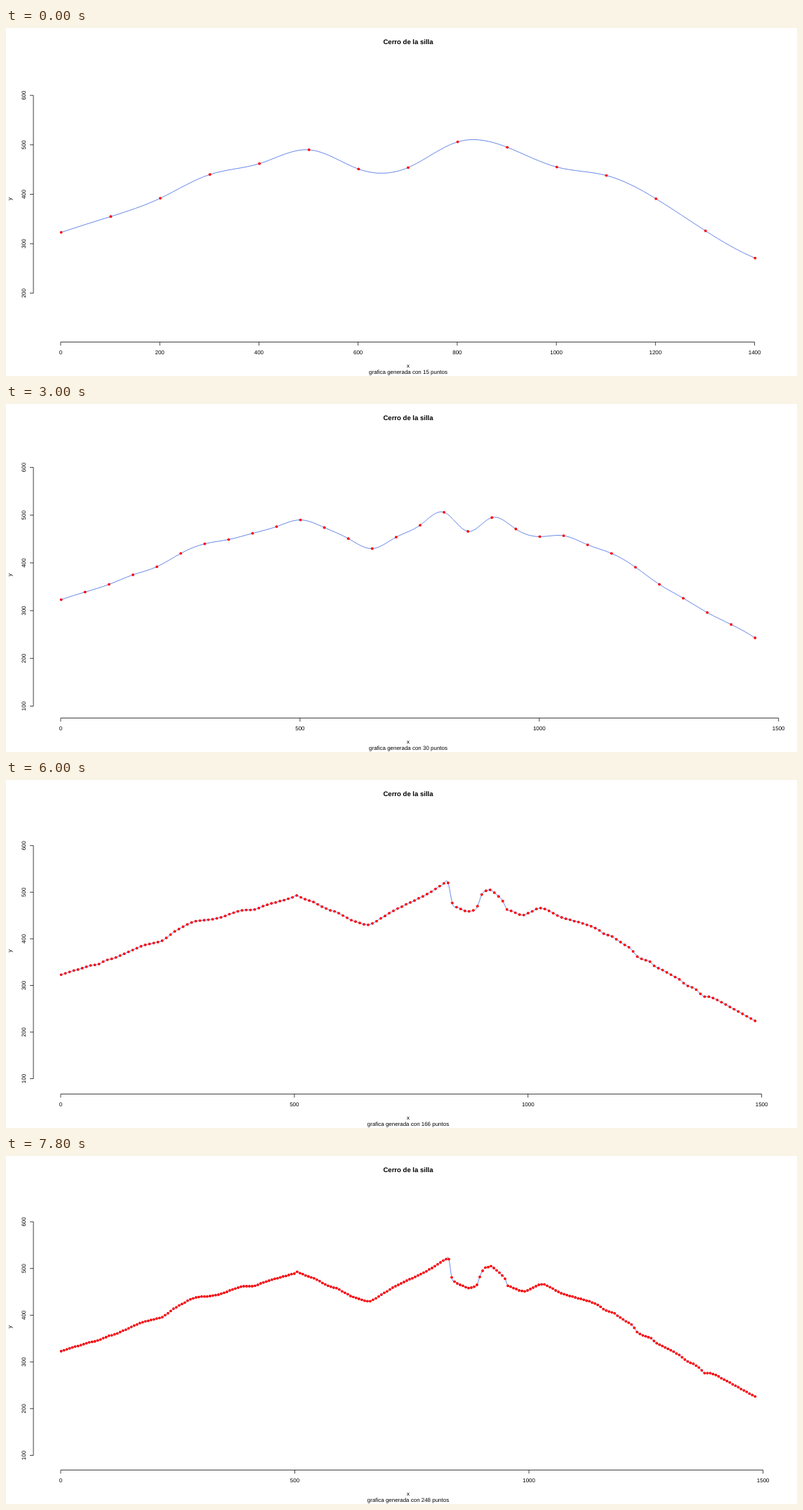
Recreate the animation shown at these times as an HTML page. Size 1127 by 497 pixels, loop 8000 ms.

```html
<!DOCTYPE html>
<html lang="es">
<head>
<meta charset="utf-8">
<title>Perfil</title>
<style>
  html, body { margin: 0; width: 100%; height: 100%; overflow: hidden; background: #fff; }
  svg { display: block; width: 1127px; height: 497px; }
  text {
    font: 7.96px "Liberation Sans", Arial, sans-serif;
    text-anchor: middle; text-rendering: geometricPrecision;
  }
  .title { font-size: 9.55px; font-weight: bold; }
  .axis { fill: none; stroke: #000; stroke-width: .75; }
  .curve { fill: none; stroke: #4169e1; stroke-width: .8; stroke-linejoin: round; }
  circle { fill: #f00; }
</style>
</head>
<body>
<svg id="stage" viewBox="0 0 1127 497"></svg>
<script>
const LOOP = 8000, HOLD = 600;
const PLOT = { left: 39.05, bottom: 448.5, midY: 244, firstX: 78.6, spanX: 988.7 };

// Ridge outline: distance, height.
const RIDGE = [
  0,323, 60,342, 80,346, 100,355, 120,361, 170,384, 210,394, 220,398, 240,414, 280,436,
  300,440, 312,440, 340,445, 380,460, 390,462, 412,462, 440,473, 500,490, 504,493, 520,486,
  540,479, 570,463, 590,457, 620,440, 650,430, 660,430, 670,435, 710,460, 780,494, 800,506,
  820,520, 828,520, 830,517, 832,503, 834,481, 840,472, 850,466, 870,458, 880,460, 890,466,
  894,482, 900,495, 906,502, 920,505, 930,496, 940,487, 948,478, 952,464, 960,461, 980,452,
  990,451, 1000,455, 1020,465, 1030,467, 1070,446, 1130,429, 1150,420, 1160,411, 1180,405,
  1200,391, 1220,379, 1230,364, 1240,358, 1260,351, 1270,341, 1300,326, 1320,315, 1340,299,
  1350,296, 1360,290, 1374,276, 1386,276, 1400,271, 1487,223
];

function ridgeHeight(x) {
  let i = 0;
  while (RIDGE[i + 2] < x) i += 2;
  const [x0, y0, x1, y1] = RIDGE.slice(i, i + 4);
  return Math.round(y0 + (y1 - y0) * (x - x0) / (x1 - x0));
}

// Second derivatives of a uniform cubic spline whose end pieces take
// their third derivative from the outer four points.
function curvature(y) {
  const last = y.length - 1;
  const third = i => y[i + 3] - 3 * y[i + 2] + 3 * y[i + 1] - y[i];
  const c = [-1], d = [-third(0)], m = [];
  for (let i = 1; i < last; i++) {
    const den = 4 - c[i - 1];
    c[i] = 1 / den;
    d[i] = (6 * (y[i + 1] - 2 * y[i] + y[i - 1]) - d[i - 1]) / den;
  }
  m[last] = (third(last - 3) + d[last - 1]) / (1 + c[last - 1]);
  for (let i = last - 1; i >= 0; i--) m[i] = d[i] - c[i] * m[i + 1];
  return m;
}

// Bezier heights of every spline piece.
function splinePieces(y) {
  const m = curvature(y);
  return y.slice(1).map((end, i) => {
    const rise = end - y[i];
    const slopeIn = rise - (2 * m[i] + m[i + 1]) / 6;
    const slopeOut = rise + (m[i] + 2 * m[i + 1]) / 6;
    return [y[i], y[i] + slopeIn / 3, end - slopeOut / 3, end];
  });
}

function bezier([a, b, c, d], t) {
  const u = 1 - t;
  return u * u * u * a + 3 * u * u * t * b + 3 * u * t * t * c + t * t * t * d;
}

const range = (from, to, step) => {
  const list = [];
  for (let v = from; v <= to; v += step) list.push(v);
  return list;
};
const label = (x, y, s, extra = "") => `<text x="${x}" y="${y}" ${extra}>${s}</text>`;
const upright = (x, y, s) => label(0, 0, s, `transform="translate(${x} ${y}) rotate(-90)"`);
const fix = v => v.toFixed(2);

function draw(step) {
  const offsets = range(0, 1486, step);
  const heights = offsets.map(ridgeHeight);
  const pieces = splinePieces(heights);
  const samples = pieces.flatMap(p => range(0, 20, 1).map(k => bezier(p, k / 20)));
  const middle = (Math.max(...samples) + Math.min(...samples)) / 2;
  const width = offsets[offsets.length - 1];
  const scale = PLOT.spanX / width;
  const px = x => fix(PLOT.firstX + (x - 1) * scale);
  const py = y => fix(PLOT.midY - (y - middle) * scale);

  const curve = pieces.map((p, i) => {
    const at = k => `${px(1 + offsets[i] + step * k / 3)} ${py(p[k])}`;
    return `${i ? "" : "M" + at(0)}C${at(1)} ${at(2)} ${at(3)}`;
  }).join("");
  const dots = offsets.map((x, i) =>
    `<circle cx="${px(x + 1)}" cy="${py(heights[i])}" r="1.9"/>`).join("");

  const { left, bottom } = PLOT;
  const halfHeight = 204.5 / scale;
  const xTicks = width > 1440 ? range(0, 1500, 500) : range(0, 1400, 200);
  const yTicks = range(100, 600, 100).filter(y => y > middle - halfHeight);
  const axes =
    `M${px(0)} ${bottom}H${px(xTicks[xTicks.length - 1])}` +
    xTicks.map(x => `M${px(x)} ${bottom}v5`).join("") +
    `M${left} ${py(yTicks[0])}V${py(600)}` +
    yTicks.map(y => `M${left} ${py(y)}h-5`).join("");

  document.getElementById("stage").innerHTML =
    label(573, 23.2, "Cerro de la silla", 'class="title"') +
    `<path class="axis" d="${axes}"/>` +
    xTicks.map(x => label(px(x), 466, x)).join("") +
    yTicks.map(y => upright(27.8, py(y), y)).join("") +
    upright(8, PLOT.midY, "y") +
    label(573, 484.8, "x") +
    label(573, 494.4, `grafica generada con ${offsets.length} puntos`) +
    `<path class="curve" d="${curve}"/>` + dots;
}

// Spacing shrinks by tens down to 10, then by ones.
const spacing = stage => stage < 10 ? 100 - 10 * stage : 19 - stage;

let shown = -1;
const start = performance.now();
function tick() {
  const stage = Math.floor((performance.now() - start) % LOOP / HOLD);
  if (stage !== shown) draw(spacing(shown = stage));
  requestAnimationFrame(tick);
}
tick();
</script>
</body>
</html>
```
